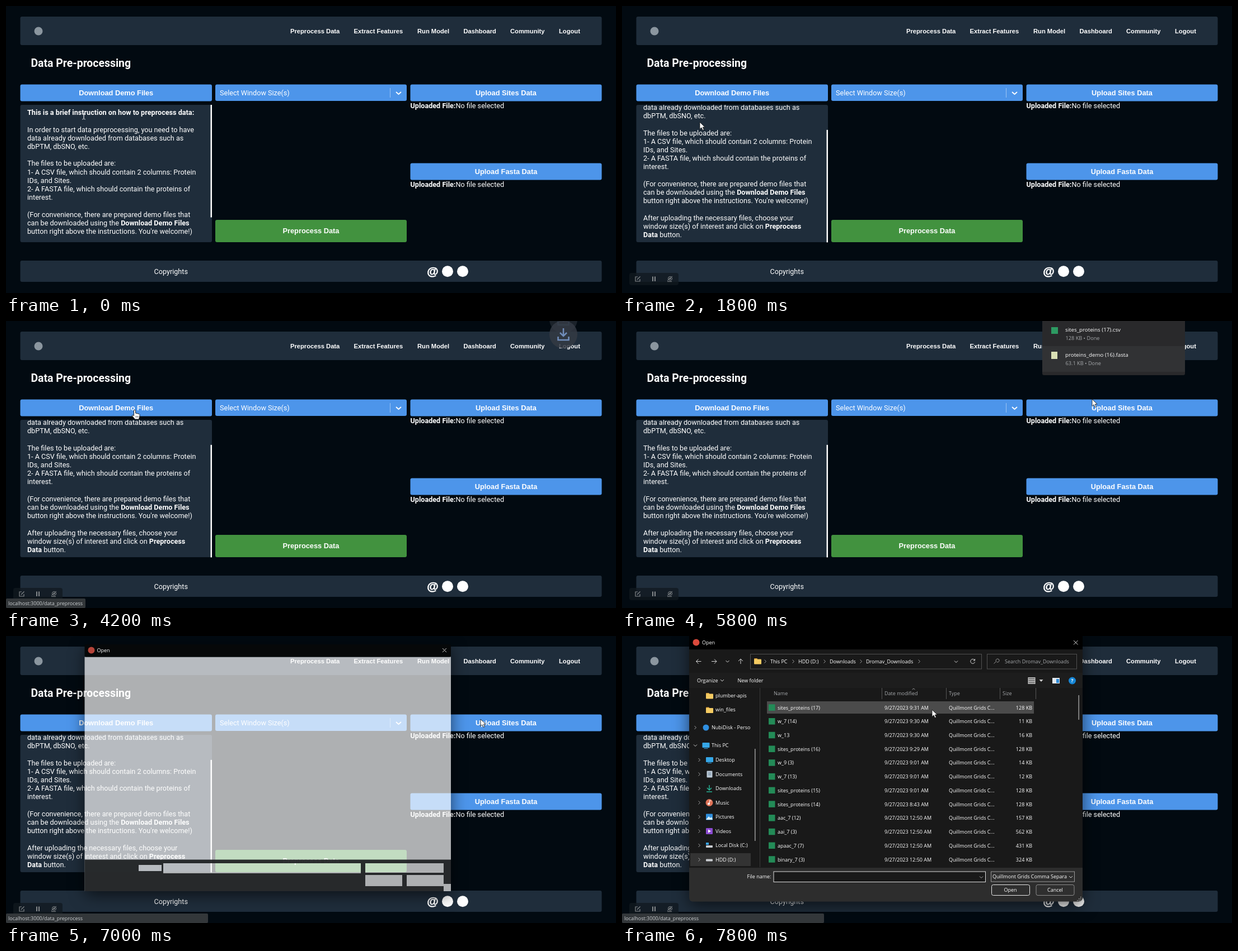
Animation of 1090x514 px, one loop 8000 ms. Source, as an HTML page:

```html
<!DOCTYPE html>
<html lang="en">
<head>
<meta charset="utf-8">
<title>Data Pre-processing</title>
<style>
  html, body { margin: 0; width: 100%; height: 100%; overflow: hidden; background: #020a11; }
  svg { display: block; }
  text { fill: #fff; white-space: pre; }
  .btn { font: bold 12.8px "Liberation Sans", Arial, sans-serif; text-anchor: middle; }
  .nav { font: bold 11.2px "Liberation Sans", Arial, sans-serif; }
  .body { font: 12.64px Roboto, sans-serif; }
  .title { font: bold 19.4px Roboto, sans-serif; }
  .ui { font: 9px "Open Sans", sans-serif; }
  .file { font: 9.75px "Open Sans", sans-serif; }
  .at { font-size: 21px; stroke: #fff; stroke-width: .6px; }
  .b { font-weight: bold; }
  .dim { fill: #a5a8ab; }
  .end { text-anchor: end; }
  .mid { text-anchor: middle; }
  .line { fill: none; stroke: #d5d5d5; }
  foreignObject { overflow: visible; }
  .shadow { height: 100%; border-radius: 7px; box-shadow: 0 7px 28px rgba(0, 0, 0, .6); }
</style>
</head>
<body>
<svg id="stage" width="1090" height="514" viewBox="0 0 1090 514"></svg>
<script>
const PANEL = '#1f2d3b', BLUE = '#4d95ea';
const rect = (x, y, w, h, fill, r = 0, extra = '') =>
  `<rect x="${x}" y="${y}" width="${w}" height="${h}" fill="${fill}" rx="${r}" ${extra}/>`;
const disc = (x, y, r, fill) => `<circle cx="${x}" cy="${y}" r="${r}" fill="${fill}"/>`;
const text = (x, y, s, cls) => `<text x="${x}" y="${y}" class="${cls}">${s}</text>`;
const line = (d, color = '#d5d5d5', w = 1) =>
  `<path class="line" d="${d}" style="stroke:${color};stroke-width:${w}"/>`;
const group = (id, s) => `<g id="${id}">${s}</g>`;
const bold = s => `<tspan class="b">${s}</tspan>`;
const chevron = (x, y) => line(`M${x - 1.5} ${y - 3}l3 3-3 3`, '#a0a0a0');
const down = (x, y, color, w) => line(`M${x - 3} ${y - 1.5}l3 3 3-3`, color, w);
// A box shadow stays outside its box, so see-through windows keep their tone.
const shadow = (x, y, w, h) =>
  `<foreignObject x="${x}" y="${y}" width="${w}" height="${h}"><div class="shadow"></div></foreignObject>`;

function page() {
  const button = (x, y, w, h, label, fill = BLUE) =>
    rect(x, y, w, h, fill, 3) + text(x + w / 2, y + h / 2 + 4, label, 'btn');
  const upload = (y, label) => button(722.5, y, 342, 30, label) +
    text(722.5, y + 42.3, bold('Uploaded File:') + 'No file selected', 'body');
  const nav = [[508, 'Preprocess Data'], [621.5, 'Extract Features'], [735, 'Run Model'],
    [817.5, 'Dashboard'], [901, 'Community'], [988, 'Logout']];
  const copy = [
    bold('This is a brief instruction on how to preprocess data:'), '',
    'In order to start data preprocessing, you need to have',
    'data already downloaded from databases such as',
    'dbPTM, dbSNO, etc.', '',
    'The files to be uploaded are:',
    '1- A CSV file, which should contain 2 columns: Protein',
    'IDs, and Sites.',
    '2- A FASTA file, which should contain the proteins of',
    'interest.', '',
    '(For convenience, there are prepared demo files that',
    `can be downloaded using the ${bold('Download Demo Files')}`,
    "button right above the instructions. You're welcome!)", '',
    'After uploading the necessary files, choose your',
    `window size(s) of interest and click on ${bold('Preprocess')}`,
    `${bold('Data')} button.`];
  return rect(25.5, 19, 1039, 51, PANEL, 3) + disc(58, 45, 7.5, '#8b969f') +
    nav.map(([x, s]) => text(x, 48.7, s, 'nav')).join('') +
    text(44.5, 108.5, 'Data Pre-processing', 'title') +
    button(25.5, 140.5, 342.5, 30, 'Download Demo Files') +
    rect(374, 140.5, 342, 29.5, BLUE, 3) + text(382, 159.6, 'Select Window Size(s)', 'body') +
    line('M686.5 147v17', '#9cc4f3') + line('M697 154l4.5 4 4.5-4', '#fff', 1.8) +
    upload(140.5, 'Upload Sites Data') + upload(281.5, 'Upload Fasta Data') +
    rect(25.5, 177, 342.5, 246, PANEL, 3) +
    '<clipPath id="panel"><rect x="25" y="177" width="343" height="246"/></clipPath>' +
    `<g clip-path="url(#panel)">${group('copy', copy.map((s, i) =>
      text(38, 195.4 + i * 15.18, s, 'body')).join(''))}</g>` +
    rect(365.5, 177, 2.5, 201.5, '#fff', 0, 'id="thumb"') +
    button(374, 383, 342, 40, 'Preprocess Data', '#42923f') +
    rect(25.5, 456, 1039, 38, PANEL, 3) + text(264.5, 479.8, 'Copyrights', 'body') +
    text(762.5, 481.5, '@', 'btn at') + disc(789, 475.3, 10, '#fff') + disc(816, 475.3, 10, '#fff');
}

function recorder() {
  const c = '#85898c';
  return rect(13, 478, 88, 22, '#10181f', 4, 'opacity=".75"') +
    line('M28 485h-4v8h8v-4M27 490l5.5-5.5', c, 1.2) +
    line('M55 484.5v8.5M59 484.5v8.5', c, 2) +
    `<circle cx="86" cy="488" r="3.5" class="line" style="stroke:${c}"/>` +
    disc(86, 488, 1.5, c) + line('M81 493.5h8M81 492l9-8', c);
}

function bubble() {
  const badge = y => disc(996, y, 25, '#343a44') +
    line(`M996 ${y - 11}v14M990 ${y - 3}l6 6 6-6M986.5 ${y + 4}v6h19v-6`, '#7f9fd2', 2.5);
  return `<g opacity=".5">${badge(-3)}</g><g opacity=".85">${badge(24)}</g>`;
}

function popup() {
  const row = (y, name, info, icon) => icon +
    text(792, y + 3.3, name, 'file') +
    text(792.5, y + 18.2, info, 'file dim" style="font-size:9.2px');
  return rect(751, -4, 255, 101, '#29292b', 3) + rect(751, 45, 255, 46, '#313234') +
    row(16, 'sites_proteins (17).csv', '128 KB • Done', rect(767, 11, 12, 12, '#2d9a62')) +
    row(60.5, 'proteins_demo (16).fasta', '63.1 KB • Done', rect(767, 55, 11, 13, '#d9dfb4'));
}

// Half-open window: a pale sheet whose footer has see-through slots.
function opening() {
  const slots = [[237, 410, 41, 11], [281, 407, 353, 18], [642, 407, 140, 17],
    [642, 428, 66, 20], [716, 428, 66, 20], [782, 444, 13, 13]];
  const holes = slots.map(([x, y, w, h]) => `M${x} ${y}h${w}v${h}h${-w}z`).join('');
  return shadow(140.5, 15, 654.5, 442) + rect(140.5, 37.5, 654.5, 419.5, '#fff', 0, 'opacity=".68"') +
    `<path d="M140.5 400.5h654.5v56.5h-654.5z${holes}" fill="#1c1e20" fill-opacity=".92" fill-rule="evenodd"/>` +
    rect(140.5, 15, 654.5, 22.5, '#060809', 2) + disc(152.5, 25.5, 6, '#b5443a') +
    text(162.5, 29.3, 'Open', 'ui') + line('M780 22l7 7m0-7l-7 7', '#ccc');
}

function dialog() {
  const folder = (x, y) => rect(x, y - 5, 6, 3, '#d9a13b', 1) + rect(x, y - 3.5, 13, 9, '#f5cb62', 1);
  const field = (x, y, w, h, color, r = 0, fill = '#191919') => rect(x, y, w, h, fill, r, `stroke="${color}"`);
  const label = (x, y, s, cls = '') => text(x, y + 3.3, s, 'ui ' + cls);

  const monitor = (x, y, fill) => rect(x, y - 5, 13, 9, fill, 1) + line(`M${x + 3} ${y + 5.5}h7`, fill);
  const drive = y => rect(150, y - 1, 12, 4, '#c9ccd0', 1);
  const places = [
    ['Desktop', y => monitor(150, y, '#35a7e8')],
    ['Documents', y => rect(151.5, y - 6, 10, 12, '#b9c7d4', 1) + line(`M154 ${y - 2}h5m-5 3h5`, '#54708a')],
    ['Downloads', y => line(`M156 ${y - 6}v9m-4-4l4 4 4-4M151 ${y + 6}h10`, '#27b295', 1.5)],
    ['Music', y => disc(156, y, 6.5, '#df7257') + disc(155, y + 2, 2, '#fff') + line(`M156.5 ${y + 2}v-6l3 1`, '#fff')],
    ['Pictures', y => rect(150, y - 5.5, 12, 11, '#2f8fdd', 1) + `<path d="M150 ${y + 5}l5-6 3 3 2-2 2 5z" fill="#d5efff"/>`],
    ['Videos', y => rect(150, y - 5.5, 12, 11, '#8b4bd0', 1) + `<path d="M154 ${y - 3}l5 3-5 3z" fill="#fff"/>`],
    ['Local Disk (C:)', y => drive(y + 1) + rect(150, y - 5, 5, 4, '#39a5ea')],
    ['HDD (D:)', drive]];
  const tree = rect(122, 389, 108, 23, '#333') +
    ['plumber-apis', 'win_files'].map((s, i) =>
      folder(150, 107 + i * 25.5) + label(167, 106.5 + i * 25.5, s)).join('') +
    chevron(131, 164) + disc(150, 164, 5.5, '#2f8fe0') + label(160, 164, 'NubiDisk - Perso') +
    down(131, 196, '#ccc') + monitor(143.5, 196, '#35a7e8') + label(160, 196, 'This PC') +
    places.map(([s, icon], i) => {
      const y = 222 + i * 25.5;
      return chevron(138, y) + icon(y) + label(167, y, s);
    }).join('') + rect(237, 202, 1.5, 165, '#9b9b9b');

  const files = [['sites_proteins (17)', '9:31', 128], ['w_7 (14)', '9:30', 11], ['w_13', '9:30', 16],
    ['sites_proteins (16)', '9:29', 128], ['w_9 (3)', '9:01', 14], ['w_7 (13)', '9:01', 12],
    ['sites_proteins (15)', '9:01', 128], ['sites_proteins (14)', '8:43', 128],
    ['aac_7 (12)', '12:50', 157], ['aai_7 (3)', '12:50', 562],
    ['apaac_7 (7)', '12:50', 431], ['binary_7 (3)', '12:50', 324]];
  const list = rect(259, 117, 477, 22, '#4b4b4b') +
    [[271, 'Name'], [469, 'Date modified'], [584, 'Type'], [680, 'Size']]
      .map(([x, s]) => label(x, 103, s, 'dim')).join('') +
    [464, 579, 675, 739].map(x => line(`M${x}.5 93v20`, '#555')).join('') +
    line('M518.5 96l2.5-2 2.5 2', '#999') +
    files.map(([name, time, size], i) => {
      const y = 128.3 + i * 24.72;
      return rect(262, y - 6, 11.5, 11.5, '#238b57') + label(278, y, name) +
        label(469, y, `9/27/2023 ${time} AM`) + label(584, y, 'Quillmont Grids C...') +
        label(733, y, size + ' KB', 'end');
    }).join('') + rect(815.5, 106, 1.5, 44, '#9b9b9b');

  const crumbs = [[265, 'This PC', 306], [315, 'HDD (D:)', 362], [371, 'Downloads', 427],
    [436, 'Dromav_Downloads', 531]];
  const bars = shadow(120, -8, 703, 483.5) + rect(120, -8, 703, 483.5, '#191919', 7) +
    rect(120, 0, 703, 24, '#000') + disc(132.5, 11.5, 6, '#dc4a3c') +
    label(143, 11.5, 'Open') + line('M807 8l7.5 7.5m0-7.5l-7.5 7.5') +
    line('M141.5 45.5h-9m4-4l-4 4 4 4M160 45.5h9m-4-4l4 4-4 4M212 50v-9m-4 4l4-4 4 4') +
    down(188.5, 45.5) +
    field(229.5, 32.5, 413, 26.5, '#505050') + folder(236, 45) + chevron(256, 45.5) +
    crumbs.map(([x, s, end]) => label(x, 45.5, s) + chevron(end, 45.5)).join('') +
    down(597, 46) + line('M630 43a4 4 0 1 0 .6 3.5M630.5 41v3h-3') +
    field(652.5, 32.5, 160, 26.5, '#505050') +
    line('M664.5 49.5l4-4a3 3 0 1 1 1 1', '#999') + label(684, 45.5, 'Search Dromav_Downloads', 'dim') +
    rect(120, 66, 703, 27, '#1d1d1d') + label(134, 79.5, 'Organize') + down(179, 79.5) +
    label(206.5, 79.5, 'New folder') +
    rect(726, 74, 12, 12, '#777') + line('M726 74.5h12m-12 3.5h12m-12 3.5h12m-12 3.5h12M726 74v12M738 74v12') +
    '<path d="M745.5 78h7l-3.5 4z" fill="#ccc"/>' + rect(769, 75, 13, 10, '#e2e8ee') +
    rect(776, 77, 5, 7, '#2d8bd8') + disc(804.5, 80, 6.5, '#1585d5') + label(804.5, 80, '?', 'b mid');

  const footer = '<path d="M120 415h703v53q0 7.5-7 7.5h-689q-7 0-7-7.5z" fill="#2d2d2d"/>' +
    label(266.5, 431, 'File name:', 'end') + field(271, 422, 378.5, 18.5, '#dedede') + down(642, 432, '#aaa') +
    field(659.5, 422, 149, 18, '#9a9a9a', 0, '#2f2f2f') +
    label(662, 431, 'Quillmont Grids Comma Separa') + down(802, 431.5) +
    field(660.5, 445.5, 68, 19, '#e8e8e8', 3, '#2f2f2f') + label(694, 455, 'Open', 'mid') +
    field(740, 445.5, 68, 19, '#8c8c8c', 3, '#2f2f2f') + label(774, 455, 'Cancel', 'mid') +
    [[819, 467], [816, 470], [819, 470], [813, 473], [816, 473], [819, 473]]
      .map(([x, y]) => rect(x, y, 1.5, 1.5, '#aaa')).join('');
  return bars + line('M246.5 93v321', '#3a3a3a') + tree + list + footer;
}

const cursors = {
  beam: line('M-3-6q3 0 3 1.5v9q0 1.5-3 1.5M3-6q-3 0-3 1.5v9q0 1.5 3 1.5', '#c9cdd1'),
  arrow: '<path d="M0 0v12.5l3-2.7 2.2 4.7 2.2-1-2.2-4.5h4z" fill="#fff" stroke="#111" stroke-width=".8"/>',
  hand: '<path d="M-1.5 1q1.5-2 3 0v5l6.5 1.5q1.5.5 1 3l-1.500 6.500h-7l-5-6q-.5-2 1.5-1.5l1.5 1.5z" ' +
    'fill="#fff" stroke="#111" stroke-width=".9"/>' + line('M2 11v3M4 11v3M6 11v3', '#333', .7)
};

const stage = document.getElementById('stage');
stage.innerHTML = page() + group('recorder', recorder()) +
  group('bubble', bubble()) + group('popup', popup()) +
  group('opening', opening()) + group('dialog', dialog()) +
  group('status', rect(0, 497, 142, 17, '#33373a', 2, 'id="statusBar"') +
    text(4, 508.5, 'localhost:3000/data_preprocess', 'ui" style="fill:#ccd0d3')) +
  group('pointer', Object.keys(cursors).map(k => group(k, cursors[k])).join(''));

const $ = id => document.getElementById(id);
const show = (id, on) => $(id).style.display = on ? '' : 'none';
// time, x, y of the pointer's hot spot
const route = [[0, 139, 197], [600, 139, 197], [1400, 139, 206], [1800, 139, 208], [2600, 204, 157],
  [3200, 216, 158], [4200, 230, 159], [5400, 888, 72], [5800, 840, 140], [6400, 848, 149],
  [7000, 848, 149], [7800, 554, 132]];

function pointerAt(t) {
  const i = Math.max(1, route.findIndex(p => p[0] >= t));
  const [a, b] = [route[i - 1], route[i]];
  const k = (t - a[0]) / (b[0] - a[0]);
  return [a[1] + (b[1] - a[1]) * k, a[2] + (b[2] - a[2]) * k];
}

function draw(now) {
  const t = Math.floor(now % 8000 / 200) * 200;
  const scroll = 54.7 * Math.min(1, Math.max(0, (t - 1400) / 400));
  $('copy').setAttribute('transform', `translate(0 ${-scroll})`);
  $('thumb').setAttribute('y', 177 + scroll * .82);
  $('recorder').setAttribute('opacity', Math.min(1, t / 400));

  show('status', t >= 2400 && t < 4800 || t >= 6000);
  $('statusBar').setAttribute('width', t >= 6600 ? 361 : 142);
  show('bubble', t >= 4000 && t < 4400);
  $('bubble').setAttribute('transform', `translate(0 ${(4200 - t) * .2})`);
  show('popup', t >= 4600 && t < 6400);
  show('opening', t === 7000);
  show('dialog', t >= 7200);

  const [x, y] = pointerAt(Math.min(t, 7800));
  const shape = t < 800 ? 'beam' : t >= 2400 && t < 4600 ? 'hand' : 'arrow';
  for (const k in cursors) show(k, k === shape);
  $('pointer').setAttribute('transform', `translate(${x} ${y})`);
}

function tick() {
  draw(performance.now());
  requestAnimationFrame(tick);
}
tick();
</script>
</body>
</html>
```
